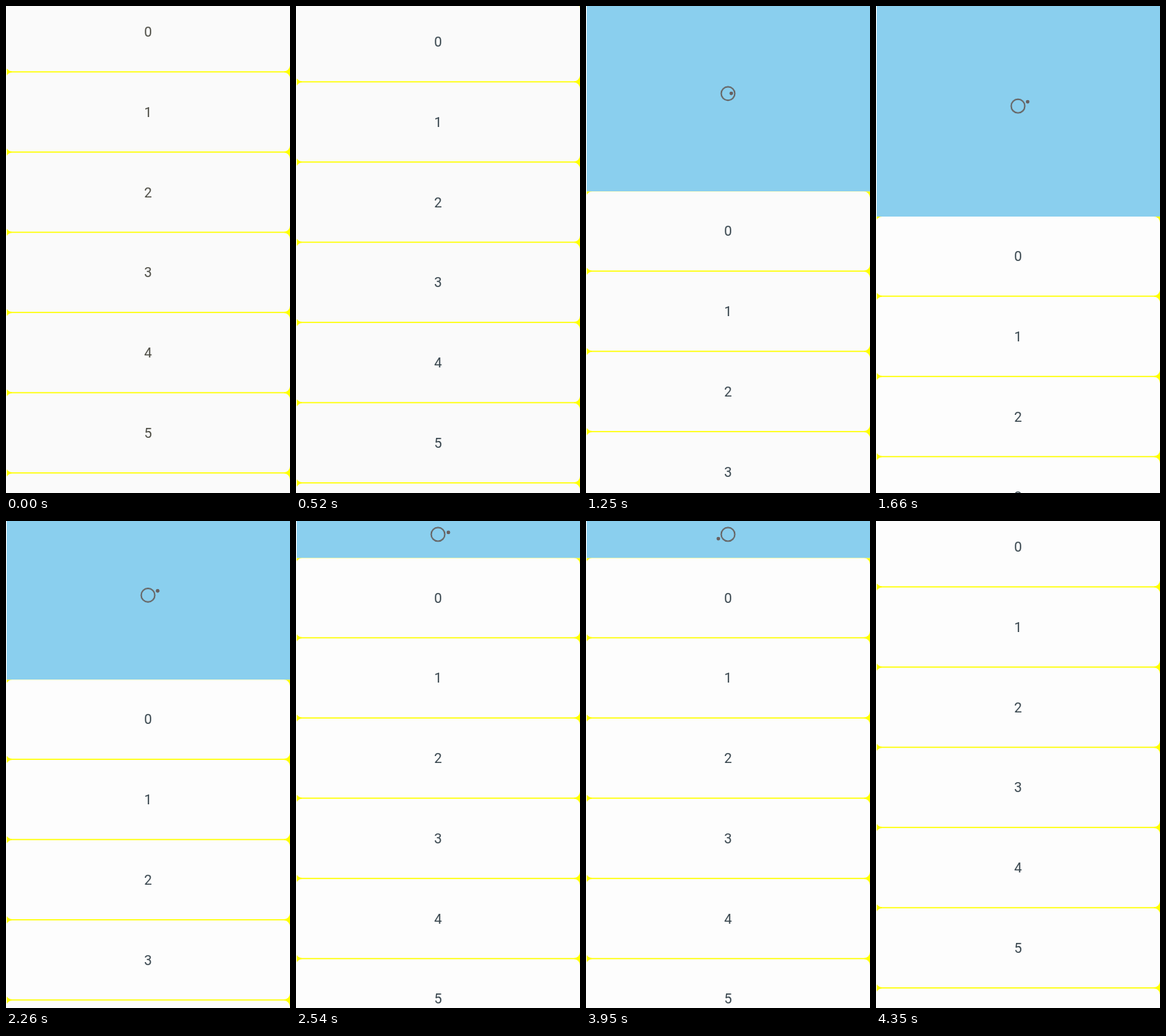
These frames come from a looping animation (371 px wide and 636 px high, 4.61 s). An HTML page:

```html
<!DOCTYPE html>
<html lang="en">
<head>
<meta charset="utf-8">
<title>Pull to refresh</title>
<style>
  html, body { margin: 0; width: 100%; height: 100%; overflow: hidden; background: #fff; }
  svg { display: block; }
  text { font: 18px Roboto, "Open Sans", sans-serif; text-anchor: middle; }
</style>
</head>
<body>
<svg width="371" height="636" viewBox="0 0 371 636">
  <defs><clipPath id="stage"><rect x="1" width="370" height="636"/></clipPath></defs>
  <g clip-path="url(#stage)">
    <rect id="header" y="-20" width="371" fill="#8acfee"/>
    <g id="icon">
      <circle r="8.9" fill="none" stroke="#686868" stroke-width="1.9"/>
      <circle id="dot" r="2.4" fill="#686060"/>
    </g>
    <g id="list">
      <rect width="371" height="760" fill="#ff0"/>
      <g id="cards"></g>
      <g id="digits"></g>
    </g>
  </g>
</svg>
<script>
const LOOP = 4610, PITCH = 104.75, GAP = 1.5;
const REST = -18, READY = 242.3, PEAK = 275, OPEN = 48.5;
const $ = id => document.getElementById(id);

function add(parent, tag, attrs, text = '') {
  const el = document.createElementNS('http://www.w3.org/2000/svg', tag);
  for (const key in attrs) el.setAttribute(key, attrs[key]);
  el.textContent = text;
  $(parent).append(el);
}
for (let i = 0; i < 7; i++) {
  const y = i * PITCH;
  add('cards', 'rect', { y, width: 371, height: PITCH - GAP, rx: 8 });
  add('digits', 'text', { x: 185.5, y: y + 58 }, i);
}

// Progress 0..1 in n jumps, the first at start and the last at end
function steps(t, start, end, n) {
  if (t < start) return 0;
  return Math.min(n, 1 + Math.floor((t - start) / (end - start) * (n - 1))) / n;
}
const smooth = p => p * p * (3 - 2 * p);

function draw(t) {
  const pull = steps(t, 450, 1250, 10);
  const stretch = steps(t, 1352, 1660, 4);
  const release = steps(t, 2260, 2400, 3);
  const close = steps(t, 4050, 4350, 4);
  const edge = REST
    + (READY - REST) * pull ** 1.3
    + (PEAK - READY) * smooth(stretch)
    + (OPEN - PEAK) * release ** 1.1
    + (REST - OPEN) * smooth(close);

  // The dot leaves the ring, swings below it to the left and back, then jumps left
  const out = smooth(steps(t, 2540, 3060, 6));
  const back = smooth(steps(t, 3130, 3800, 8));
  const swing = t < 3950 ? out - back : 1;
  const angle = (-3 - 21 * stretch + 180 * swing) * Math.PI / 180;
  const radius = 4.3 + 9.5 * stretch;
  const shade = Math.round(250 + pull + 2 * stretch);

  $('header').setAttribute('height', edge + 20);
  $('list').setAttribute('transform', `translate(0 ${edge})`);
  $('icon').setAttribute('transform', `translate(185.5 ${edge / 2 - 6.8})`);
  $('dot').setAttribute('cx', radius * Math.cos(angle));
  $('dot').setAttribute('cy', radius * Math.sin(angle));
  $('cards').setAttribute('fill', `rgb(${shade},${shade},${shade})`);
  $('digits').setAttribute('fill', pull ? '#36444c' : '#4b4b43');
}

const begin = performance.now();
function tick() {
  draw((performance.now() - begin) % LOOP);
  requestAnimationFrame(tick);
}
tick();
</script>
</body>
</html>
```
